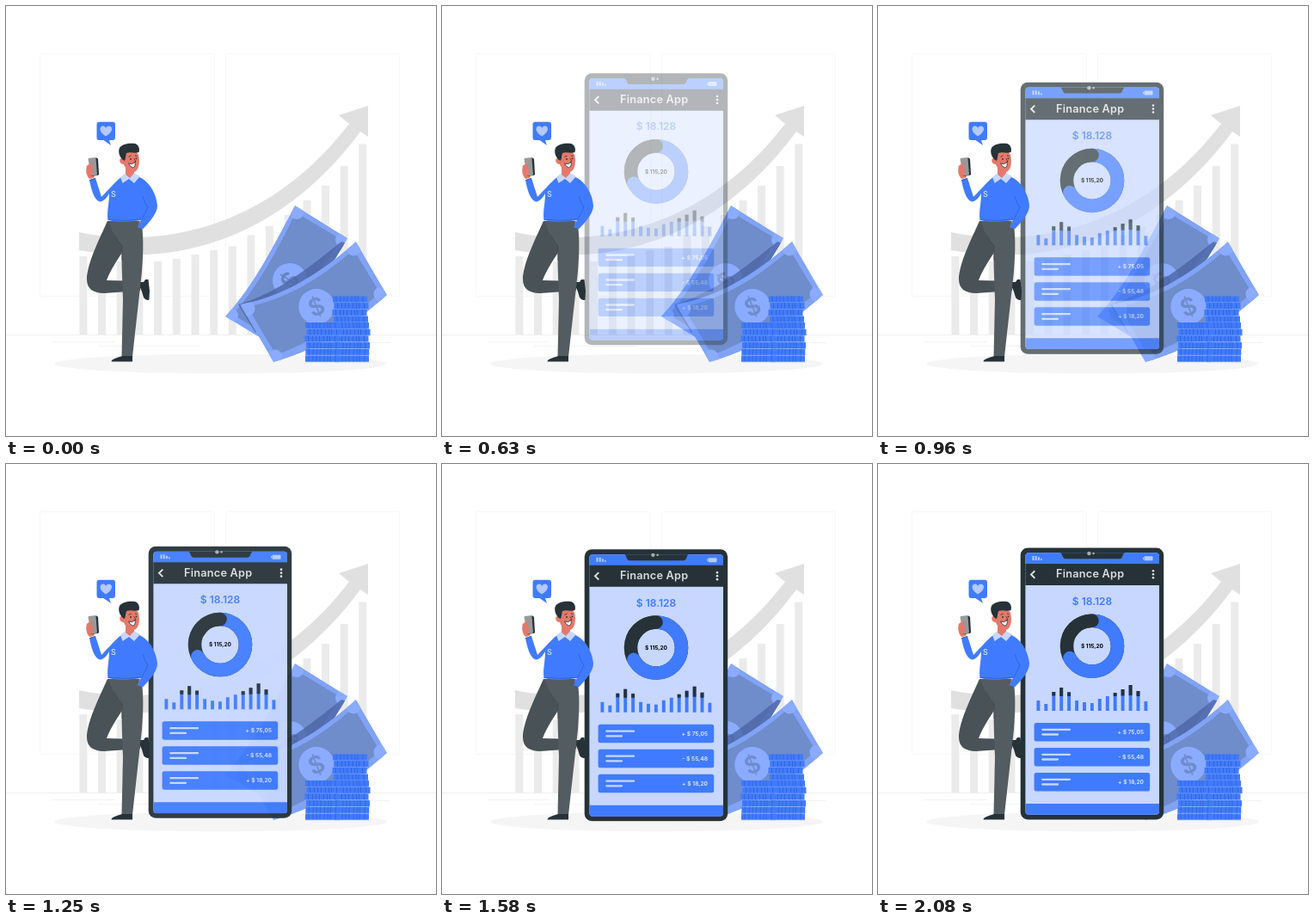
An HTML page without scripts that plays this animation: 500x500 px, repeating every 2.12 s.

```html
<!DOCTYPE html>
<html lang="en">
<head>
<meta charset="utf-8">
<title>Finance app</title>
<style>
html, body { margin: 0; width: 100%; height: 100%; overflow: hidden; background: #fff; }
svg { display: block; width: 100vw; height: 100vh; }
text { font-family: Inter, "Open Sans", sans-serif; font-weight: 600; }
.blue { fill: #407bff; }
.dark { fill: #263238; }
.pale { fill: #c7d7ff; }
.skin { fill: #e4796b; }
.mid { text-anchor: middle; }
.ring { fill: none; stroke-width: 15.6; }
.sum { font-size: 6.7px; font-weight: 500; text-anchor: end; fill: #e3ebff; }
.phone { animation: drop 2120ms infinite; }
.gate { animation: gate 2120ms step-end infinite; }
@keyframes drop {
  0% { opacity: 0; transform: translateY(-30px); animation-timing-function: cubic-bezier(.36, -.01, .5, 1.38); }
  94%, 100% { opacity: 1; transform: none; }
}
@keyframes gate {
  0% { visibility: hidden; }
  8.02%, 100% { visibility: visible; }
}
</style>
</head>
<body>
<svg viewBox="0 0 500 500">
  <defs>
    <g id="coin">
      <rect width="40" height="7.3" class="blue"/>
      <path d="M4 0v7.3M9 0v7.3M13 0v7.3M17 0v7.3M22 0v7.3M26 0v7.3M29 0v7.3M35 0v7.3" stroke="#3465d3" stroke-width=".9"/>
      <path d="M0 7.4H40" stroke="#8fb0ff" stroke-width=".6"/>
    </g>
    <g id="pile">
      <use href="#coin"/>
      <use href="#coin" x="1.5" y="7.7"/>
      <use href="#coin" x="-.5" y="15.4"/>
      <use href="#coin" x="1" y="23.1"/>
      <use href="#coin" x=".3" y="30.8"/>
      <use href="#coin" x="0" y="38.5"/>
    </g>
    <g id="row">
      <rect x="181.6" y="301" width="134.6" height="21.4" rx="2.5" class="blue"/>
      <path d="M191.3 308.8H223M191.3 314.5H209" stroke="#c7d7ff" stroke-width="2.3" stroke-linecap="round"/>
    </g>
    <path id="back" d="M336 232L397 270C370 320 340 350 296 386L255 361C290 322 310 280 336 232Z"/>
    <path id="front" d="M272 347C320 338 360 315 407 274L443 336C400 375 355 403 311 414Z"/>
    <clipPath id="backClip"><use href="#back"/></clipPath>
    <clipPath id="frontClip"><use href="#front"/></clipPath>
    <clipPath id="screen"><rect x="171.4" y="103.3" width="155.6" height="304.5" rx="4"/></clipPath>
  </defs>

  <!-- backdrop -->
  <g fill="none" stroke="#f7f7f7">
    <rect x="39.5" y="55.5" width="203" height="282" rx="2"/>
    <rect x="255.5" y="55.5" width="202" height="282" rx="2"/>
    <path d="M0 382.5H500" stroke="#efefef"/>
    <path d="M53 390.5H126M107 395.5H225M418 391.5H447" stroke="#f3f3f3"/>
  </g>
  <ellipse cx="249.5" cy="416" rx="193.5" ry="11.3" fill="#f5f5f5"/>
  <path fill="#ebebeb" d="M85.4 382V291h9V382zM107 382V294h9V382zM128.700 382V297h9V382zM150.400 382V298h9V382zM172 382V297h9V382zM193.800 382V294h9V382zM215.500 382V289h9V382zM237.200 382V284h9V382zM258.800 382V279.500h9V382zM280.400 382V266.500h9V382zM302 382V256h9V382zM323.800 382V243h9V382zM345.500 382V226h9V382zM367 382V209h9V382zM388.700 382V186h9V382zM410.300 382V160.500h9V382z"/>
  <path fill="#e0e0e0" d="M85 263C175 282 303 262 399 137L387 127 421 116V152L412 146C315 277 190 303 85 284Z"/>

  <!-- money -->
  <g clip-path="url(#backClip)">
    <use href="#back" fill="#80a3f6"/>
    <path fill="#6f8ccb" d="M337 240L389 271C362 318 335 345 296 378L264 359C295 322 315 285 337 240Z"/>
    <g fill="#8aabff">
      <circle cx="338" cy="240" r="8"/><circle cx="391" cy="272" r="8"/>
      <circle cx="262" cy="360" r="8"/><circle cx="330" cy="319" r="20"/>
    </g>
    <text class="mid" font-size="27" fill="#6682bf" transform="translate(330 319) rotate(-58)" y="9.500">$</text>
    <path fill="#4d66a6" opacity=".8" d="M270 347C315 334 350 306 390 274L410 280 290 380Z"/>
  </g>
  <g clip-path="url(#frontClip)">
    <use href="#front" fill="#80a3f6"/>
    <path fill="#6f8ccb" d="M281 350C322 341 362 321 404 283L435 334C398 364 358 389 314 406Z"/>
    <g fill="#8aabff">
      <circle cx="404" cy="282" r="8.500"/><circle cx="436" cy="335" r="8.500"/>
      <circle cx="313" cy="408" r="8.500"/><circle cx="281" cy="352" r="8.500"/>
      <circle cx="361" cy="349.500" r="20.700"/>
    </g>
    <text class="mid" font-size="28" fill="#6f8ccb" transform="translate(361 349.500) rotate(-22)" y="10">$</text>
  </g>
  <use href="#pile" x="380" y="337.500"/>
  <use href="#pile" x="382" y="368"/>
  <use href="#pile" x="348" y="368"/>

  <!-- phone -->
  <g class="gate"><g class="phone">
    <rect x="165.700" y="97.500" width="166.500" height="316" rx="8.500" class="dark"/>
    <g clip-path="url(#screen)">
      <path class="pale" d="M171 103H328V408H171z"/>
      <path class="blue" d="M171 103H328V116.500H171zM171 395H328V408H171z"/>
      <path class="dark" d="M171 116H328V141H171zM211 103C215 103 214 110.300 218 110.300H281C285 110.300 284 103 288 103z"/>
    </g>
    <g fill="#a7abad"><circle cx="245.400" cy="104" r="2.200"/><circle cx="250.600" cy="104" r="1.300"/></g>
    <g fill="#b3caff">
      <path d="M179.500 107h2v5h-2zM182.700 107h2v5h-2zM185.900 108.300h2v3.700h-2zM189 110h1.600v2h-1.600z"/>
      <rect x="309.500" y="107.300" width="10" height="5" rx="1"/><path d="M308 108.700h1v2.200h-1z"/>
    </g>
    <path d="M182.300 124.300L178 128.500 182.300 132.700" fill="none" stroke="#e0e0e0" stroke-width="1.900"/>
    <g fill="#e0e0e0"><circle cx="320" cy="124.300" r="1.300"/><circle cx="320" cy="128.300" r="1.300"/><circle cx="320" cy="132.300" r="1.300"/></g>
    <text class="mid" x="246.700" y="132.400" font-size="12.700" letter-spacing=".25" fill="#d9dbdc">Finance App</text>
    <text class="mid blue" x="249" y="163.700" font-size="12">$ 18.128</text>

    <g transform="translate(249 211.700)">
      <circle class="ring" r="29.500" stroke="#263238"/>
      <circle class="ring" r="29.500" stroke="#407bff" pathLength="360" stroke-dasharray="242 118" stroke-linecap="round" transform="rotate(-90)"/>
      <circle class="ring" r="29.500" stroke="#263238" pathLength="360" stroke-dasharray="60 300" stroke-linecap="round" transform="rotate(-150)"/>
      <text class="mid" y="2.400" font-size="6.500" style="font-weight:700">$ 115,20</text>
    </g>

    <g fill="none" stroke-width="3.900">
      <path stroke="#407bff" d="M186.400 287v-12M195.300 287v-8M204.300 287v-22M213.200 287v-27M222.100 287v-22M231.100 287v-12M240 287v-10M248.900 287v-9M257.800 287v-14M266.800 287v-17M275.700 287v-21M284.600 287v-25M293.600 287v-30M302.500 287v-23M311.400 287v-11"/>
      <path stroke="#263238" d="M204.300 265v4.500M213.200 260v10M222.100 265.500v4.500M275.700 266v4M284.600 262v7.500M293.600 257v12M302.500 264v6"/>
    </g>
    <use href="#row"/><use href="#row" y="29"/><use href="#row" y="58"/>
    <g class="sum">
      <text x="309" y="314">+ $ 75,05</text>
      <text x="309" y="343">- $ 55,48</text>
      <text x="309" y="372">+ $ 18,20</text>
    </g>
  </g></g>

  <!-- man -->
  <path class="dark" d="M153 321L158 332 160 339C162 342 166 343 166.500 341L167 331 165.500 318 162 318 160 321Z"/>
  <path fill="#495256" d="M118 250C109 270 94 300 94 318C94 329 102 334 114 334L156 331V320L117 319C122 305 132 292 139 280L146 250Z"/>
  <path fill="#535c60" d="M119 250H157C160 264 160 284 158 309L147 408H134.500L136 340C135 310 134 292 135 279C130 275 124 264 119 250Z"/>
  <path d="M126 266Q130 274 135 279V296" fill="none" stroke="#3e474b" stroke-width=".8"/>
  <path class="dark" d="M135 407H147V413.500H122.500C123 410 130 409 135 407Z"/>

  <path class="skin" d="M155 250L162 249 159 258 154 258Z"/>
  <path class="blue" d="M134 199C128 203 121 212 111 222L104 200 97 202C99 213 102 225 109 227.500C113 228 118 222 120 218C120 230 117 239 118.500 249C130 252 146 251 157 249L153 257 159 259.500C167 251 176 241 176 232C175 219 167 204 155 199Z"/>
  <path d="M159 221Q161 230 165 234L158 248M118.500 248Q138 251 157 248" fill="none" stroke="#3263d0" stroke-width=".9"/>
  <path d="M97 203L104 200.500" stroke="#3263d0" stroke-width="1.200"/>
  <text x="122" y="221.500" font-size="9" fill="#c7d7ff">S</text>
  <path class="skin" d="M139 186V198L144 202 149 196V188Z"/>
  <path class="pale" d="M138 195L133 199 135.500 206 143 201 149 206 156 198 149 194.500 144 200Z"/>

  <path class="skin" d="M137 171C142 166 151 167 154 173C156 181 155 191 149 193C142 193 138 188 137 184C131 184 131 176 135 177Z"/>
  <path class="dark" d="M136 179C132 176 130 169 132 165C135 160 144 159 150 160C154 161 156 166 154.500 170C150 172 145 169 140 171C139 174 139 178 138 180Z"/>
  <path d="M142.500 183Q147 185 150 181.500Q151 187 147.500 188Q144 187 142.500 183Z" fill="#fff" stroke="#263238" stroke-width=".8"/>
  <path d="M142.500 175.500L145.500 174M150 174L152.500 174.500M149 177.500L151 181 149 181.500" fill="none" stroke="#263238" stroke-width=".8"/>
  <g class="dark"><circle cx="145" cy="178" r=".9"/><circle cx="151.500" cy="177.300" r=".9"/></g>

  <path class="skin" d="M94 187L98 182 104 194 102 200 97 201C94 198 92 192 94 187Z"/>
  <path d="M96.500 177L105 176.500Q106.500 176.500 107 178L108 195.500Q108 197 106 197L99 198Z" fill="#263238"/>
  <path d="M95.500 178Q95.500 177 97 177L104.500 176.700 106 196.500 99 197.700Z" fill="#999"/>
  <path class="skin" d="M93.500 186L99 183Q102 185 99 188L102 191 100 197 95 196Z"/>

  <path class="blue" d="M108.500 134.800H124Q127 134.800 127 137.800V153Q127 156 124 156H120L122 162 113.500 156H108.500Q105.500 156 105.500 153V137.800Q105.500 134.800 108.500 134.800Z"/>
  <path fill="#b3caff" d="M116.200 151.500C112 149 109.500 146 109.500 143C109.500 139 114.500 138.300 116.200 142C118 138.300 123 139 123 143C123 146 120 149 116.200 151.500Z"/>
</svg>
</body>
</html>
```
